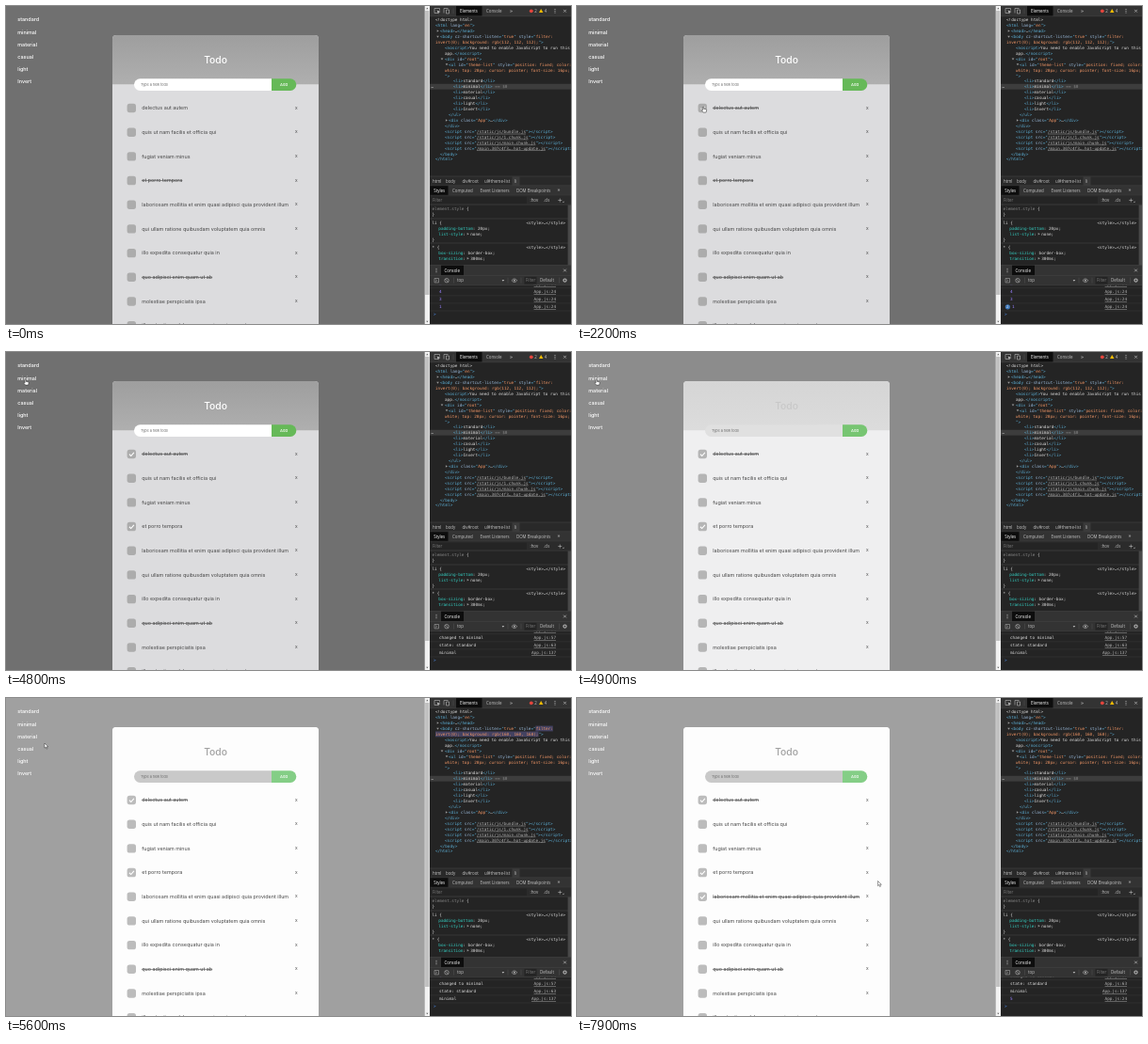
Recreate the animation shown at these times as an HTML page. Size 600x338 px, loop 8000 ms.

```html
<!DOCTYPE html>
<html lang="en">
<head>
<meta charset="utf-8">
<title>Todo themes</title>
<style>
  html, body { margin: 0; width: 100%; height: 100%; overflow: hidden; background: #707070; }
  svg { display: block; width: 100vw; height: 100vh; }
  text { white-space: pre; }
  .page { font-family: Inter, "Open Sans", sans-serif; }
  .ui { font: 4.4px "Open Sans", "Noto Sans", sans-serif; fill: #c4c4c4; }
  .code { font: 4.33px "DejaVu Sans Mono", "Liberation Mono", monospace; fill: #dedede; }
  .t { fill: #5db0d7; }
  .a { fill: #9bbbdc; }
  .v { fill: #f29766; }
  .x { fill: #dedede; }
  .d { fill: #8a8a8a; }
  .p { fill: #35d4c7; }
  .n { fill: #9980ff; }
  .l { fill: #b4b4b4; text-decoration: underline; }
  .struck { text-decoration: line-through; }
</style>
</head>
<body>
<svg id="stage" viewBox="0 0 600 338" preserveAspectRatio="none"></svg>
<script>
const LOOP = 8000, STEP = 100;
const THEME_AT = 4800, FADE = 300, DOM_AT = 5300, FLASH = 1400;
const stage = document.getElementById('stage');

function el(parent, tag, attrs = {}, text) {
  const node = document.createElementNS('http://www.w3.org/2000/svg', tag);
  for (const k in attrs) node.setAttribute(k, attrs[k]);
  if (text !== undefined) node.textContent = text;
  parent.appendChild(node);
  return node;
}
const group = (parent, attrs) => el(parent, 'g', attrs);
const rect = (parent, x, y, width, height, fill, rx = 0) =>
  el(parent, 'rect', { x, y, width, height, fill, rx });
const path = (parent, d, stroke, width = 0.6, fill = 'none') =>
  el(parent, 'path', { d, stroke, 'stroke-width': width, fill });
const label = (parent, x, y, text, attrs = {}) => el(parent, 'text', { x, y, ...attrs }, text);

// Each segment starts with a one-letter style class.
function codeLine(parent, x, y, segments) {
  const node = el(parent, 'text', { x, y, class: 'code' });
  return segments.map(s => el(node, 'tspan', { class: s[0] }, s.slice(1)));
}

const clamp = u => Math.min(1, Math.max(0, u));
const mix = (a, b, u) => a + (b - a) * u;
const blend = (a, b, u) => `rgb(${a.map((c, i) => Math.round(mix(c, b[i], u)))})`;

// The CSS "ease" curve, solved by bisection.
function ease(u) {
  if (u <= 0 || u >= 1) return clamp(u);
  const bez = (s, p, q) => 3 * s * (1 - s) ** 2 * p + 3 * s * s * (1 - s) * q + s ** 3;
  let lo = 0, hi = 1;
  for (let i = 0; i < 20; i++) {
    const m = (lo + hi) / 2;
    if (bez(m, .25, .25) < u) lo = m; else hi = m;
  }
  return bez(lo, .1, 1);
}

// ---- Todo page ----
const page = group(stage, { class: 'page' });
const themed = [];
const theme = (node, from, to, attr = 'fill') => themed.push({ node, from, to, attr });
const grey = c => [c, c, c];

theme(rect(page, 0, 0, 446, 338), grey(112), grey(160));
theme(rect(page, 113, 31, 219, 320, '', 4), [220, 220, 222], grey(253));
const shade = el(page, 'linearGradient', { id: 'shade', x2: 0, y2: 1 });
theme(el(shade, 'stop', { offset: 0 }), grey(158), grey(253), 'stop-color');
theme(el(shade, 'stop', { offset: 1 }), grey(175), grey(253), 'stop-color');
path(page, 'M113 83.3V35a4 4 0 0 1 4-4h211a4 4 0 0 1 4 4v48.3z', 'none', 0, 'url(#shade)');
theme(label(page, 222.5, 61, 'Todo', { 'font-size': 10.3, 'font-weight': 500, 'text-anchor': 'middle' }),
  grey(255), grey(160));
theme(path(page, 'M282 77.3v12.6H142.3a6.3 6.3 0 0 1 0-12.6z', 'none'), grey(255), grey(201));
theme(path(page, 'M282 77.3v12.6h20a6.3 6.3 0 0 0 0-12.6z', 'none'), [102, 185, 88], [132, 206, 134]);
label(page, 143, 84.9, 'Type a new todo', { 'font-size': 3.7, fill: '#6c6c6c' });
label(page, 295, 85, 'Add', { 'font-size': 4.1, 'font-weight': 500, fill: '#fff', 'text-anchor': 'middle' });

const MENU = ['standard', 'minimal', 'material', 'casual', 'light', 'Invert'];
const menuY = i => 14.5 + 13.1 * i;
MENU.forEach((name, i) =>
  label(page, 12.3, menuY(i) + 1.9, name, { 'font-size': 5.4, 'font-weight': 500, fill: '#fff' }));

const rowY = i => 108.5 + 25.68 * i;
const TODOS = [
  { text: 'delectus aut autem', click: 2200 },
  { text: 'quis ut nam facilis et officia qui' },
  { text: 'fugiat veniam minus' },
  { text: 'et porro tempora', done: true, click: 3700 },
  { text: 'laboriosam mollitia et enim quasi adipisci quia provident illum', click: 7000 },
  { text: 'qui ullam ratione quibusdam voluptatem quia omnis' },
  { text: 'illo expedita consequatur quia in' },
  { text: 'quo adipisci enim quam ut ab', done: true },
  { text: 'molestiae perspiciatis ipsa' },
  { text: 'illo est ratione doloremque quia maiores aut', done: true }
];
const rows = TODOS.map((todo, i) => {
  const y = rowY(i);
  theme(rect(page, 128.6, y - 4.7, 9.4, 9.4, '', 2.6), grey(172), grey(188));
  const check = path(page, `M130.9 ${y + .2}l1.8 1.8 3.2-3.7`, '#fff', 1.1);
  const text = label(page, 144.3, y + 1.7, todo.text, { 'font-size': 5.41, fill: '#464646' });
  label(page, 308.4, y + 1.1, 'X', { 'font-size': 3.8, fill: '#333', 'text-anchor': 'middle' });
  return { ...todo, check, text };
});

// Scrollbar
rect(stage, 444.7, 0, 5.3, 338, '#f1f1f1');
rect(stage, 445.1, 5, 4.4, 302, '#c1c1c1');
path(stage, 'M446.1 3.2l1.2-1.4 1.2 1.4zM446.1 334.8l1.2 1.4 1.2-1.4z', 'none', 0, '#606060');

// ---- Developer tools ----
const tools = group(stage);
const ui = (x, y, text, fill = '#c4c4c4', size = 4.4) =>
  label(tools, x, y + 1.55, text, { class: 'ui', style: `fill:${fill};font-size:${size}px` });
const bar = (y, h, fill = '#333') => rect(tools, 450, y, 150, h, fill);
const rule = (y, stroke = '#484848') => path(tools, `M450 ${y}h150`, stroke, .5);
const split = (x, y) => path(tools, `M${x} ${y - 3}v6`, '#555', .5);
const dots = (x, y) => [-1.7, 0, 1.7].forEach(d => el(tools, 'circle', { cx: x, cy: y + d, r: .55, fill: '#bbb' }));
const cross = (x, y) => path(tools, `M${x - 1.4} ${y - 1.4}l2.8 2.8m0-2.8l-2.8 2.8`, '#bbb', .7);

bar(0, 338, '#242424');
bar(0, 10.8);
path(tools, 'M459 7.5h-4v-5h5.5v2', '#bbb');
path(tools, 'M457.5 4.5l4 1.5-1.7.7-.7 1.7z', 'none', 0, '#bbb');
path(tools, 'M465 7.5v-5h4.5M467.5 4h3v4h-3z', '#bbb');
split(475, 5.3);
rect(tools, 478, 0, 27.5, 10.8, '#0d0d0d');
ui(482, 5.3, 'Elements', '#fff');
ui(510, 5.3, 'Console');
ui(535, 5, '»', '#ccc', 6);
el(tools, 'circle', { cx: 557.8, cy: 5.3, r: 1.9, fill: '#e5453d' });
ui(561.3, 5.3, '2');
path(tools, 'M566 7l2.2-4 2.2 4z', 'none', 0, '#f4bd00');
ui(571.8, 5.3, '4');
dots(583, 5.3);
cross(593.5, 5.3);
rule(10.8);

const domY = i => 14.7 + 5.93 * i;
const flash = group(tools);
rect(flash, 562.4, domY(3) - 2.9, 18.4, 5.8, '#4d4b72');
rect(flash, 456, domY(4) - 2.9, 109.5, 5.8, '#4d4b72');
rect(tools, 450, domY(12) - 3.1, 150, 5.9, '#3d3d3d');
label(tools, 451.5, domY(12) + 1, '…', { class: 'code' });

const item = name => [475, 't<li>', 'x' + name, 't</li>'];
const script = src => [466, 't<script ', 'asrc', 't="', 'l' + src, 't"><\/script>'];
const DOM = [
  [456, 'x<!doctype html>'],
  [456, 't<html ', 'alang', 't="', 'ven', 't">'],
  [461, 't<head>', 'x…', 't</head>'],
  [461, 't<body ', 'acz-shortcut-listen', 't="', 'vtrue', 't" ', 'astyle', 't="', 'vfilter:'],
  [456, 'vinvert(0); background: ', 'v', 't">'],
  [466, 't<noscript>', 'xYou need to enable JavaScript to run this'],
  [466, 'xapp.', 't</noscript>'],
  [466, 't<div ', 'aid', 't="', 'vroot', 't">'],
  [470, 't<ul ', 'aid', 't="', 'vtheme-list', 't" ', 'astyle', 't="', 'vposition: fixed; color:'],
  [466, 'vwhite; top: 20px; cursor: pointer; font-size: 16px;'],
  [466, 't">'],
  ...MENU.map(item),
  [470, 't</ul>'],
  [470, 't<div ', 'aclass', 't="', 'vApp', 't">', 'x…', 't</div>'],
  [466, 't</div>'],
  ...['/static/js/bundle.js', '/static/js/1.chunk.js', '/static/js/main.chunk.js', '/main.307c4f3….hot-update.js'].map(script),
  [461, 't</body>'],
  [456, 't</html>']
];
DOM[12].push('d == $0');
const domLines = DOM.map(([x, ...segments], i) => codeLine(tools, x, domY(i) + 1.5, segments));
const colour = domLines[4][1];
const arrow = (x, y, open) =>
  path(tools, open ? `M${x - 1.3} ${y - .8}h2.6l-1.3 2z` : `M${x - .8} ${y - 1.3}v2.6l2-1.3z`, 'none', 0, '#9a9a9a');
arrow(458.5, domY(2));
arrow(458.5, domY(3), true);
arrow(463, domY(7), true);
arrow(468, domY(8), true);
arrow(467.7, domY(18));

bar(181, 9.8, '#292929');
rule(181);
rect(tools, 537.5, 181.3, 8, 9.4, '#3a3a3a');
[[453, 'html'], [467, 'body'], [484.5, 'div#root'], [508, 'ul#theme-list'], [540, 'li']]
  .forEach(([x, s]) => ui(x, 186, s));

bar(190.8, 10.5);
rect(tools, 450.5, 190.8, 19, 10.5, '#0d0d0d');
rule(190.8);
ui(454.3, 196, 'Styles', '#fff');
[[474, 'Computed'], [503.5, 'Event Listeners'], [542, 'DOM Breakpoints']].forEach(([x, s]) => ui(x, 196, s));
ui(585.5, 195.7, '»', '#ccc', 6);
rule(201.3);
bar(201.5, 9.6, '#2b2b2b');
rect(tools, 451, 202.6, 102, 7.6, '#242424');
ui(453, 206.5, 'Filter', '#7d7d7d');
ui(556.5, 206.5, ':hov');
ui(571, 206.5, '.cls');
path(tools, 'M586.3 206.5h4m-2-2v4', '#bbb');
path(tools, 'M592.5 209l-1.7 0 1.7-1.7z', 'none', 0, '#999');

[211.2, 226, 252].forEach(y => rule(y));
const css = (x, y, ...segments) => codeLine(tools, x, y + 1.5, segments);
css(452.5, 215.5, 'delement.style', 'x {');
css(452.5, 221.5, 'x}');
css(452.5, 230.3, 'xli {');
css(552.5, 230.3, 'x<style>…</style>');
css(459.3, 236.5, 'ppadding-bottom', 'x: 20px;');
css(459.3, 242.4, 'plist-style', 'x:  none;');
arrow(490.5, 242.2);
css(452.5, 248.6, 'x}');
css(452.5, 256.3, 'x* {');
css(552.5, 256.3, 'x<style>…</style>');
css(459.3, 262.4, 'pbox-sizing', 'x: border-box;');
css(459.3, 268.4, 'ptransition', 'x:  300ms;');
arrow(490.5, 268.2);
rect(tools, 596.6, 211.5, 3.4, 64, '#484848');

// Console drawer
const consoleLog = group(tools);
rect(tools, 450, 275.5, 150, 21.2, '#333');
rule(275.5);
rect(tools, 462, 275.7, 24, 10.5, '#0d0d0d');
dots(457, 281);
ui(465.5, 281, 'Console', '#fff');
cross(593.5, 281);
rule(286.4);
path(tools, 'M455 289.5h4.5v4.4H455zM456.2 290.7l1.4 1.1-1.4 1.1', '#bbb', .5);
path(tools, 'M466.4 290l3.2 3.4M470.2 291.7a2.2 2.2 0 1 1-4.4 0a2.2 2.2 0 1 1 4.4 0', '#bbb');
split(475.5, 291.6);
ui(479, 291.6, 'top');
path(tools, 'M526.6 291h2.6l-1.3 1.8z', 'none', 0, '#bbb');
split(533, 291.6);
path(tools, 'M537 291.7q2.9-3.6 5.8 0q-2.9 3.6-5.8 0z', '#bbb');
el(tools, 'circle', { cx: 539.9, cy: 291.7, r: .9, fill: '#bbb' });
split(547, 291.6);
rect(tools, 550.5, 287.8, 13, 7.8, '#242424');
ui(552, 291.6, 'Filter', '#7d7d7d');
ui(567, 291.6, 'Default');
split(587.5, 291.6);
el(tools, 'circle', { cx: 593.5, cy: 291.6, r: 1.6, fill: 'none', stroke: '#bbb', 'stroke-width': 1.1 });
rule(296.7);
label(tools, 454, 328.6, '>', { class: 'code', style: 'fill:#4e8ff0' });

const LOG = [
  { at: -1, text: '8' }, { at: -1, text: '4' }, { at: -1, text: '3' },
  { at: -1, text: '1', repeat: 2200 },
  { at: 3700, text: '4' },
  { at: 4700, text: 'changed to minimal', line: 57 },
  { at: 4700, text: 'state: standard', line: 63 },
  { at: 4700, text: 'minimal', line: 137 },
  { at: 7000, text: '5' }
];
const logRows = [0, 1, 2, 3].map(i => {
  const y = 295.5 + 8.1 * i;
  const text = label(consoleLog, 460, y + 1.5, '', { class: 'code' });
  const link = label(consoleLog, 584, y + 1.5, '', { class: 'code l', 'text-anchor': 'end' });
  const badge = group(consoleLog);
  el(badge, 'circle', { cx: 457.4, cy: y, r: 2.6, fill: '#3f78b8' });
  label(badge, 457.4, y + 1.3, '2', { class: 'ui', style: 'fill:#fff;font-size:3.6px', 'text-anchor': 'middle' });
  path(consoleLog, `M450 ${y + 4.2}h150`, '#3a3a3a', .5);
  return { text, link, badge };
});

// ---- Pointer ----
const pointer = group(stage);
const arrowShape = path(pointer, 'M0 0v5.2l1.2-1.1.9 2 .9-.4-.9-1.9h1.7z', '#222', .45, '#fff');
const handShape = path(pointer,
  'M-.4.3q.6-.6 1 0v2l2.6.6q.5.3.4 1l-.5 2.2h-3L-1.7 4q0-.8.7-.6l.6.5z', '#222', .45, '#fff');
const TRACK = [
  [400, 444, 230], [1000, 199.5, 143.5], [1400, 185, 130], [2000, 134, 107], [2500, 134, 107],
  [3200, 135, 182], [3800, 134.5, 182.5], [4400, 16, 24], [4600, 20.5, 29], [5100, 20.5, 29],
  [5600, 41, 48], [5900, 52, 66], [6700, 134, 210], [7200, 134, 210], [7900, 319.5, 194.5]
];
function pointerAt(t) {
  const i = Math.max(1, TRACK.findIndex(k => k[0] >= t));
  const [t0, x0, y0] = TRACK[i - 1], [t1, x1, y1] = TRACK[i];
  const u = clamp((t - t0) / (t1 - t0)), s = u * u * (3 - 2 * u);
  return [mix(x0, x1, s), mix(y0, y1, s)];
}
const show = (node, on) => node.setAttribute('visibility', on ? 'inherit' : 'hidden');

function draw(t) {
  const u = ease((t - THEME_AT) / FADE);
  themed.forEach(({ node, from, to, attr }) => node.setAttribute(attr, blend(from, to, u)));

  rows.forEach(({ done, click, check, text }) => {
    const clicked = click !== undefined && t >= click;
    check.setAttribute('opacity', clicked ? ease((t - click + STEP) / FADE) : 0);
    text.setAttribute('class', clicked !== !!done ? 'struck' : '');
  });

  const level = t < DOM_AT ? 112 : 160;
  colour.textContent = `rgb(${grey(level).join(', ')});`;
  flash.setAttribute('opacity', t < DOM_AT ? 0 : 1 - clamp((t - DOM_AT) / FLASH));

  const recent = LOG.filter(m => m.at <= t).slice(-4);
  logRows.forEach(({ text, link, badge }, i) => {
    const m = recent[i], repeated = m.repeat <= t;
    text.textContent = m.text;
    text.setAttribute('x', repeated ? 462 : 460);
    text.setAttribute('class', m.line ? 'code' : 'code n');
    link.textContent = `App.js:${m.line || 24}`;
    show(badge, repeated);
  });

  const [x, y] = pointerAt(t);
  const overBox = Math.abs(x - 133.3) < 5 && rows.some((r, i) => Math.abs(y - rowY(i)) < 4.8);
  const overMenu = x > 11 && x < 36 && MENU.some((m, i) => Math.abs(y - menuY(i)) < 4);
  pointer.setAttribute('transform', `translate(${x} ${y})`);
  show(pointer, t >= TRACK[0][0]);
  show(handShape, overBox || overMenu);
  show(arrowShape, !overBox && !overMenu);
}

const start = performance.now();
function tick() {
  const t = (performance.now() - start) % LOOP;
  draw(Math.floor(t / STEP) * STEP);
  requestAnimationFrame(tick);
}
tick();
</script>
</body>
</html>
```
